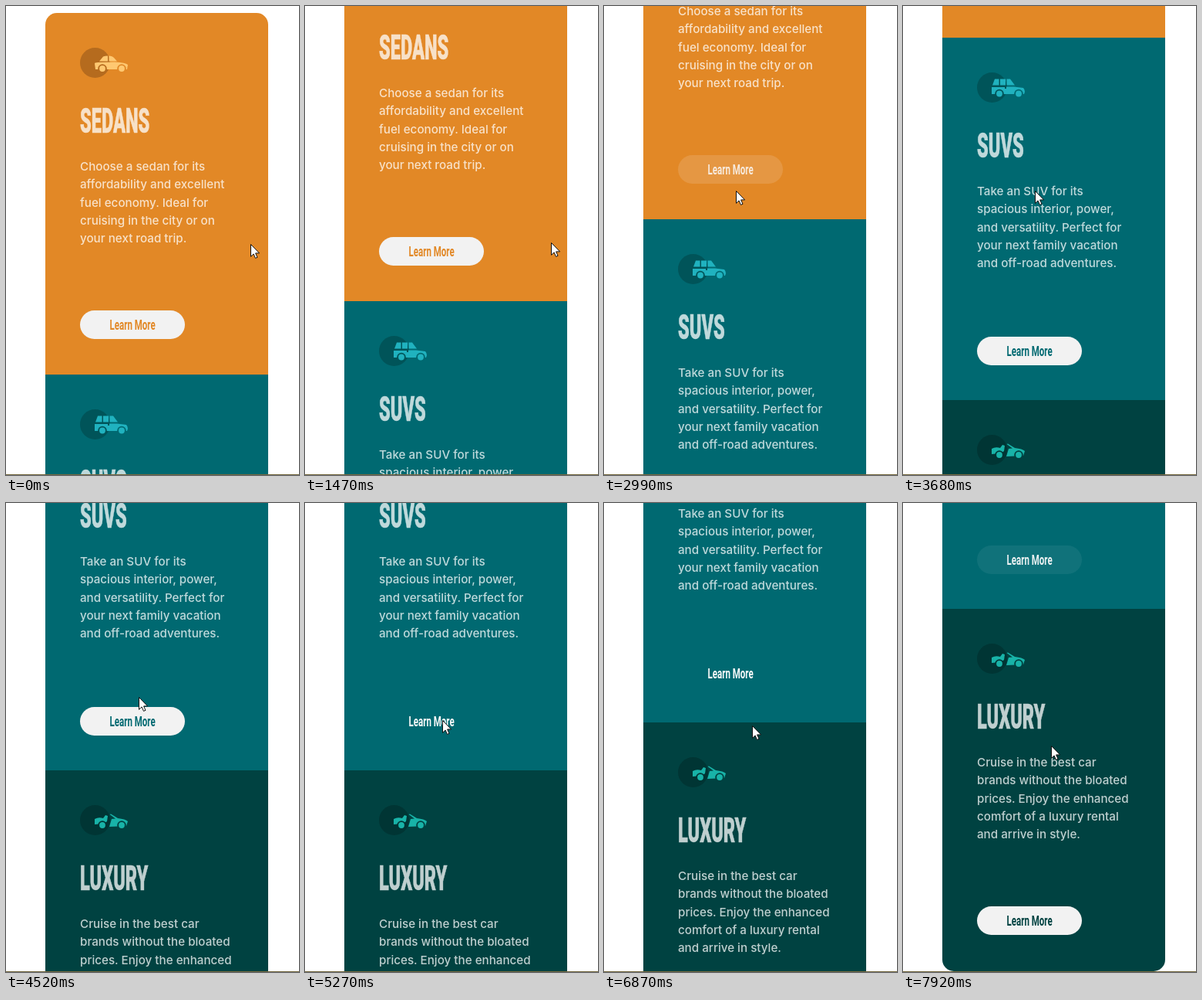
An HTML page for the animation above (7.99 s loop, 380x607 px).

```html
<!DOCTYPE html>
<html lang="en">
<head>
<meta charset="utf-8">
<title>Car cards</title>
<style>
  html, body { margin: 0; width: 100%; height: 100%; overflow: hidden; background: #fff; }
  #stage { position: relative; width: 380px; height: 607px; overflow: hidden; background: #fff; }
  #stage::after { content: ""; position: absolute; left: 0; top: 606px; width: 100%; height: 1px; background: #75693f; }
  #page { position: absolute; left: 51px; top: 9px; width: 289px; height: 1406px; border-radius: 15px; overflow: hidden; will-change: transform; }
  .card { position: absolute; left: 0; width: 100%; height: 470px; background: var(--bg); color: #fff; }
  .card > * { position: absolute; margin: 0; left: 45px; white-space: nowrap; }
  .icon { top: 45px; width: 64px; height: 40px; }
  h2, p { opacity: .75; }
  h2 { top: 115px; font: 900 44px/50px Roboto, sans-serif; -webkit-text-stroke: .7px #fff; transform: scaleX(.535); transform-origin: 0 50%; }
  p { top: 187px; font: 500 15.2px/23.25px Inter, sans-serif; }
  .btn { width: 136px; height: 37px; border-radius: 19px; display: flex; justify-content: center; }
  .btn span { font: 700 17.6px/38px Roboto, sans-serif; transform: scaleX(.655); }
  #cursor { position: absolute; left: 0; top: 0; overflow: visible; z-index: 1; }
</style>
</head>
<body>
<div id="stage">
  <div id="page"></div>
  <svg id="cursor" width="14" height="20">
    <path d="M.5 .5V16.3L4.1 12.9 6.5 18.4 9 17.3 6.6 11.9H11.6Z" fill="#fff" stroke="#111"/>
  </svg>
</div>
<script>
const LOOP = 7990, TICK = 69.3, FADE = 280;

// hovers: [enter, leave] times of the pointer on the card's button
const cards = [
  { title: "SEDANS", top: 0, btn: 385, rgb: [226, 136, 38], dark: "#b56b1e", car: "#ffc871",
    text: ["Choose a sedan for its", "affordability and excellent", "fuel economy. Ideal for", "cruising in the city or on", "your next road trip."],
    body: "M19 20.5Q19 19 23 19L45 18.5Q59 19 62 22L61 28H20Z M25 17.5L30 11.5Q32 10.5 36 10.5V17.5Z M37.5 10.5Q42 10.5 44 13L48 17.5H37.5Z",
    wheelY: 27, hovers: [[1950, 2955]] },
  { title: "SUVS", top: 468, btn: 387, rgb: [0, 105, 113], dark: "#005459", car: "#20b2bf",
    text: ["Take an SUV for its", "spacious interior, power,", "and versatility. Perfect for", "your next family vacation", "and off-road adventures."],
    body: "M19 19H36V21H38V18.5H48L60 20Q62 22 62 25L61 28H19Z M20 16.5L23 8.5H28.5V16.5Z M30 8.5H37V16.5H30Z M38.5 8.5H43L49 16.5H38.5Z",
    wheelY: 27.5, hovers: [[4590, 6040], [6400, 7897]] },
  { title: "LUXURY", top: 937, btn: 385, rgb: [0, 66, 65], dark: "#003534", car: "#18b3a8",
    text: ["Cruise in the best car", "brands without the bloated", "prices. Enjoy the enhanced", "comfort of a luxury rental", "and arrive in style."],
    body: "M19 18Q24 15 30 17L33 13 36 14 35 21 31 24 19 25Z M38 28L41 18 46 17.5 38.5 12 40 11.5 49 17Q59 18 62 21L60 27Z",
    wheelY: 26, hovers: [] }
];

// Moves are [start, duration, ...destination], each eased from the previous place.
const wheelMoves = [[1266, 420, 200], [2980, 420, 400], [3618, 170, 500], [3970, 260, 600], [6720, 430, 809]];
const mouseMoves = [
  [1380, 90, 319, 306], [1600, 420, 172, 216], [2900, 80, 171, 239], [4440, 210, 174, 276],
  [4750, 1150, 182, 288], [5900, 140, 187, 310], [6250, 250, 192, 288], [7840, 74, 192, 314]
];

const clamp = u => Math.min(1, Math.max(0, u));
const ease = u => u * u * (3 - 2 * u);
const rgb = c => `rgb(${c.map(Math.round)})`;

function place(from, moves, t) {
  return moves.reduce((pos, [start, time, ...to]) => {
    const u = ease(clamp((t - start) / time));
    return pos.map((v, i) => v + (to[i] - v) * u);
  }, from).map(Math.round);
}

function fillAt(hovers, t) {
  return hovers.reduce((fill, [enter, leave]) =>
    fill - clamp((t - enter) / FADE) + clamp((t - leave) / FADE), 1);
}

const disc = (x, y, r, fill) => `<circle cx="${x}" cy="${y}" r="${r}" fill="${fill}"/>`;
const wheel = (x, y, gap, fill) => disc(x, y, 5.8, gap) + disc(x, y, 3.9, fill);

const page = document.getElementById("page");
const pointer = document.getElementById("cursor");
page.innerHTML = cards.map(c => `
  <section class="card" style="top:${c.top}px;--bg:${rgb(c.rgb)}">
    <svg class="icon" viewBox="0 0 64 40">
      ${disc(19.5, 19.5, 19.5, c.dark)}
      <path d="${c.body}" fill="${c.car}"/>
      ${wheel(29, c.wheelY, c.dark, c.car)}${wheel(54, c.wheelY, rgb(c.rgb), c.car)}
    </svg>
    <h2>${c.title}</h2>
    <p>${c.text.join("<br>")}</p>
    <div class="btn" style="top:${c.btn}px"><span>Learn More</span></div>
  </section>`).join("");
const buttons = [...page.querySelectorAll(".btn")];

function draw(now) {
  const t = (Math.floor(now % LOOP / TICK) + 0.2) * TICK;
  const [scroll] = place([0], wheelMoves, t);
  const [x, y] = place([317, 308], mouseMoves, t);
  page.style.transform = `translateY(${-scroll}px)`;
  pointer.style.transform = `translate(${x}px, ${y}px)`;
  cards.forEach((c, i) => {
    const fill = fillAt(c.hovers, t);
    buttons[i].style.background = `rgba(242, 242, 242, ${fill.toFixed(3)})`;
    buttons[i].style.color = rgb(c.rgb.map(v => 250 + (v - 250) * fill));
  });
}

const origin = performance.now();
function loop() {
  draw(performance.now() - origin);
  requestAnimationFrame(loop);
}
loop();
</script>
</body>
</html>
```
